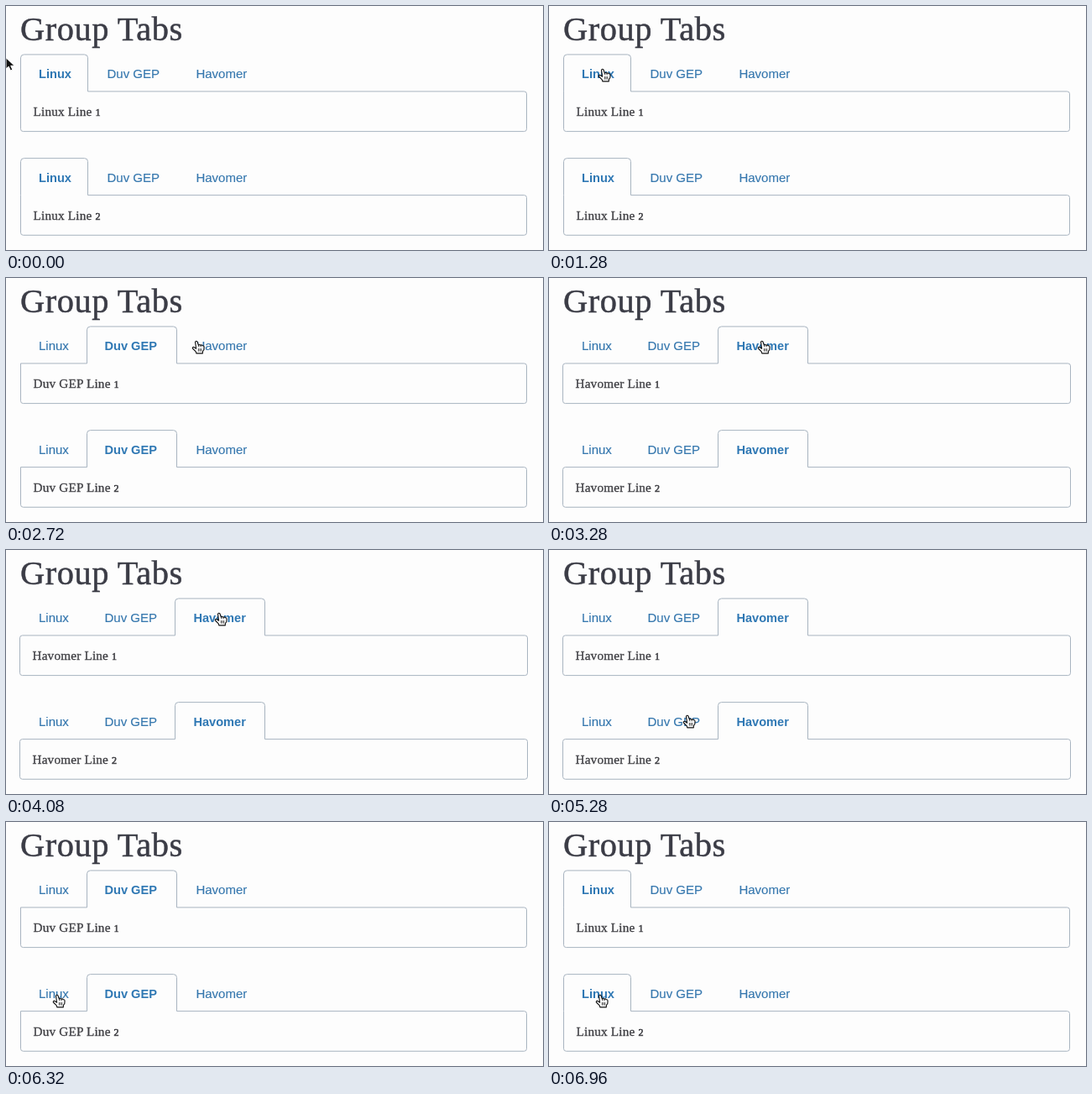
Recreate the animation shown at these times as an HTML page. Size 640x291 px, loop 7040 ms.

```html
<!DOCTYPE html>
<html lang="en">
<head>
<meta charset="utf-8">
<title>Group Tabs</title>
<style>
  html, body { margin: 0; width: 100%; height: 100%; overflow: hidden; background: #fdfdfd; }
  svg { display: block; width: 640px; height: 291px; }
  .title { font: 40.4px "Liberation Serif", serif; letter-spacing: .55px; fill: #3b3c46; stroke: #3b3c46; stroke-width: .5px; }
  .line { font: 15.2px "Liberation Serif", serif; letter-spacing: .2px; fill: #404045; stroke: #404045; stroke-width: .35px; }
  .digit { font-size: 12px; stroke-width: .6px; }
  .tab { font: 15px "Liberation Sans", Arial, sans-serif; fill: #3577ae; stroke: #3577ae; stroke-width: .15px; }
  .active { font-size: 14.6px; font-weight: bold; fill: #2f78b4; stroke: none; }
  .frame { fill: none; stroke: #a8b4c0; }
</style>
</head>
<body>
<svg viewBox="0 0 640 291">
  <text class="title" x="17" y="40.5">Group Tabs</text>
  <g id="groups"></g>
  <g id="cursor" stroke-linejoin="round" stroke-linecap="round">
    <path id="arrow" fill="#111" stroke="#fff" d="M0 0V13L3.2 10.2L5.4 15L7.8 14L5.7 9.3H9.8Z"/>
    <g id="hand" fill="#fff" stroke="#111" stroke-width="1.2" transform="scale(.94)">
      <path d="M-1.6 1.4Q-.6-.6 1 1L2.6 5.6Q4 4 5.2 5.6Q6.6 4.4 7.6 6.2Q9.2 5.6 9.6 7.6L9.4 11.2L7.8 13.4V15.8H-.2L-.8 13.6L-4.9 9.6Q-5.4 7.4-3.2 8L-.4 9.8Z"/>
      <path fill="none" stroke-width=".8" d="M2.5 10V13M4.3 10V13M6.1 10V13M2.6 5.6L3 7.5M5.2 5.6L5.5 7.5"/>
    </g>
  </g>
</svg>
<script>
const LOOP = 7040, STEP = 80, CLICK_DELAY = 240;
const PITCH = 123.7, TOP = 57.9, BAR = 101.9, BOTTOM = 149.6;

const tabs = [
  { name: "Linux", width: 35 },
  { name: "Duv GEP", width: 62.4 },
  { name: "Havomer", width: 61 }
];

// Pointer moves; a move that names a tab ends with a click on it
const moves = [
  { from: 780, to: 1260, x: 64, y: 75, tab: 0 },
  { from: 1500, to: 1840, x: 150, y: 75, tab: 1 },
  { from: 2240, to: 2960, x: 254, y: 75, tab: 2 },
  { from: 4380, to: 5160, x: 165, y: 197, tab: 1 },
  { from: 5520, to: 5840, x: 90, y: 198 },
  { from: 5840, to: 6240, x: 61, y: 206, tab: 0 }
];

const $ = id => document.getElementById(id);
const snap = v => Math.floor(v) + .5;
const ease = k => k * k * (3 - 2 * k);

function group(selected, number) {
  const last = selected === tabs.length - 1;
  const left = last ? 16.5 : 17.5, right = 638 - left, corner = last ? 3 : 0;
  let x = 39, labels = "", a, b;
  tabs.forEach(({ name, width }, i) => {
    const active = i === selected, w = active ? width + 3 : width;
    if (active) [a, b] = [snap(x - 21.5), snap(x + w + 20.9)];
    labels += `<text class="tab ${active ? "active" : ""}" x="${x}" y="86">${name}</text>`;
    x += w + 43.5;
  });
  const outline = `M${left + corner} ${BAR}H${a}V${TOP + 4}q0-4 4-4H${b - 4}q4 0 4 4V${BAR}H${right - 3}q3 0 3 3` +
    `V${BOTTOM - 3}q0 3-3 3H${left + 3}q-3 0-3-3V${BAR + corner}q0 ${-corner} ${corner} ${-corner}Z`;
  return `<g transform="translate(0 ${(number - 1) * PITCH})"><path class="frame" d="${outline}"/>${labels}
    <text class="line" x="${left + 15}" y="131">${tabs[selected].name} Line <tspan class="digit">${number}</tspan></text></g>`;
}

function stateAt(t) {
  let x = 0, y = 62, selected = 0;
  for (const m of moves) {
    const k = ease(Math.min(1, Math.max(0, (t - m.from) / (m.to - m.from))));
    x += (m.x - x) * k;
    y += (m.y - y) * k;
    if ("tab" in m && t >= m.to + CLICK_DELAY) selected = m.tab;
  }
  return { x, y, selected };
}

let shown = -1;
function draw(now) {
  const { x, y, selected } = stateAt(Math.floor(now % LOOP / STEP) * STEP);
  if (selected !== shown) {
    shown = selected;
    $("groups").innerHTML = group(selected, 1) + group(selected, 2);
  }
  const inBar = dy => y > TOP + dy && y < BAR + dy;
  const overTab = x > 17 && x < 309 && (inBar(0) || inBar(PITCH));
  $("cursor").setAttribute("transform", `translate(${x} ${y})`);
  $("hand").style.display = overTab ? "" : "none";
  $("arrow").style.display = overTab ? "none" : "";
}

const start = performance.now();
function tick() {
  draw(performance.now() - start);
  requestAnimationFrame(tick);
}
tick();
</script>
</body>
</html>
```
